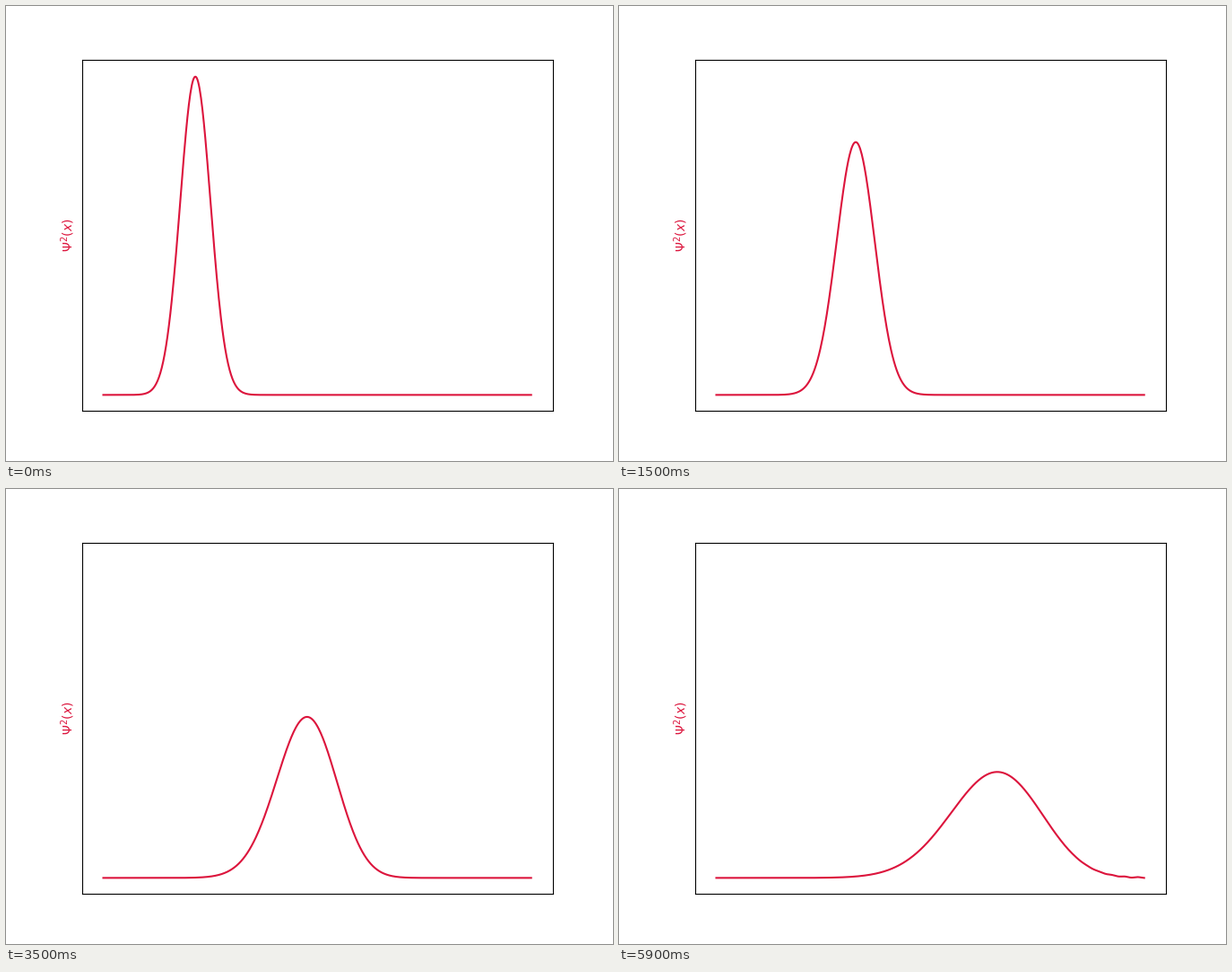
These frames come from a looping animation (677x507 px, 6 s). A matplotlib script:

```python
import numpy as np
import matplotlib.pyplot as plt
from matplotlib.animation import FuncAnimation

W, H, DPI = 677, 507, 100
FRAMES, INTERVAL = 60, 100
COLOR = "crimson"

# Wave packet in a box of unit length
X0, WIDTH, K0 = 0.2042, 0.05, 58.26
SPACING = 0.008      # lattice step of the dispersion relation
DT, LEAD = 1.318e-4, 1.5

x = np.linspace(0, 1, 601)
k = np.pi * np.arange(1, 91)
modes = np.sin(np.outer(x, k))
energy = (1 - np.cos(k * SPACING)) / SPACING**2

packet = np.exp(-(x - X0)**2 / (2 * WIDTH**2) + 1j * K0 * x)
coeffs = 2 * (x[1] - x[0]) * (modes.T @ packet)


def density(frame):
    """Probability density of the packet at the given frame."""
    t = (frame + LEAD) * DT
    return np.abs(modes @ (coeffs * np.exp(-1j * energy * t)))**2


# The small margin keeps the pixel size from being rounded down
fig, ax = plt.subplots(figsize=((W + 0.001) / DPI, (H + 0.001) / DPI), dpi=DPI)
fig.subplots_adjust(left=84.66 / W, right=609.57 / W,
                    bottom=55.87 / H, top=446.95 / H)
ax.set(xlim=(-0.05, 1.05), ylim=(-0.05, 1.05), xticks=[], yticks=[])
fig.text(74 / W, 251.4 / H, r"$\Psi^2(x)$", color=COLOR, fontsize=10,
         rotation=90, rotation_mode="anchor", ha="center", va="baseline")
line, = ax.plot(x, density(0), color=COLOR, lw=1.5)


def update(frame):
    line.set_ydata(density(frame))
    return line,


anim = FuncAnimation(fig, update, frames=FRAMES, interval=INTERVAL,
                     repeat=True, repeat_delay=0)
plt.show()
```
